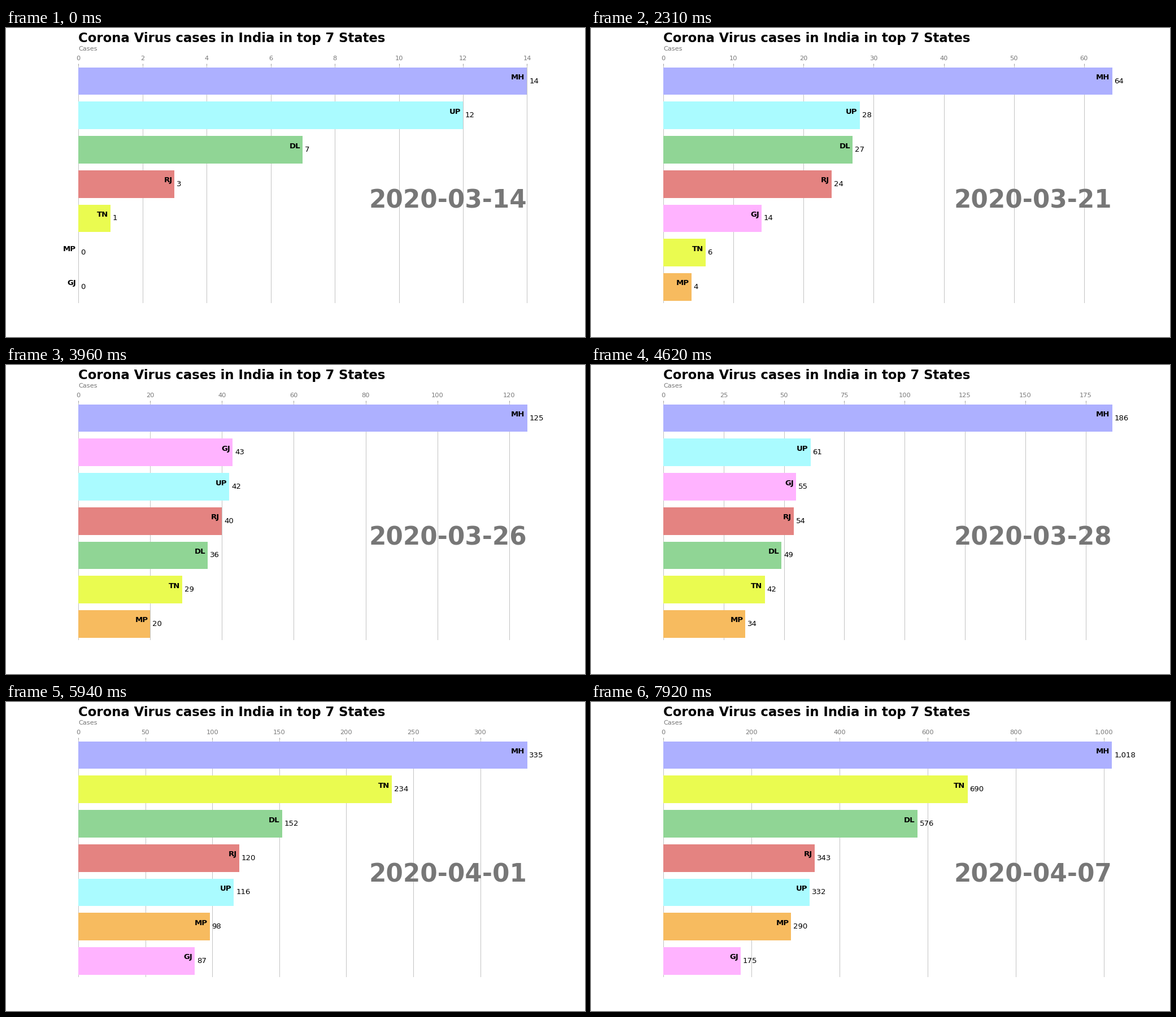
Write a matplotlib script that moves like this. It is 1025 px wide and 547 px high and loops after 8000 ms.

```python
import matplotlib.pyplot as plt
from matplotlib.animation import FuncAnimation
from matplotlib.ticker import StrMethodFormatter

W, H, DPI = 1025, 547, 64
PT = W / 15 / DPI          # the layout is designed for a 15 inch wide figure
LOOP, STEP, HOLD = 8000, 40, 330
DAYS = 25
GREY = "#777777"

states = []


def add_state(name, color, *cases):
    """Register a state; days before its first report count as zero."""
    states.append((name, color, [0] * (DAYS - len(cases)) + list(cases)))


add_state("MH", "#adb0ff", 14, 32, 38, 41, 45, 48, 52, 64, 74, 97, 107, 122, 125,
          153, 186, 203, 220, 302, 335, 423, 490, 635, 748, 868, 1018)
add_state("UP", "#aafbff", 12, 13, 13, 15, 16, 19, 23, 28, 30, 33, 35, 38, 42,
          50, 61, 72, 96, 103, 116, 126, 174, 234, 278, 305, 332)
add_state("DL", "#90d595", 7, 7, 7, 8, 10, 14, 20, 27, 29, 30, 31, 35, 36,
          40, 49, 72, 97, 120, 152, 293, 386, 445, 503, 523, 576)
add_state("RJ", "#e48381", 3, 3, 4, 4, 7, 9, 17, 24, 28, 32, 32, 38, 40,
          48, 54, 59, 79, 93, 120, 133, 179, 206, 266, 301, 343)
add_state("TN", "#eafb50", 1, 1, 1, 1, 2, 3, 3, 6, 9, 12, 18, 26, 29,
          38, 42, 50, 67, 124, 234, 309, 411, 485, 571, 621, 690)
add_state("MP", "#f7bb5f", 4, 4, 6, 7, 9, 15, 20,
          30, 34, 39, 47, 66, 98, 107, 154, 179, 215, 256, 290)
# The tiny third-day value only lifts GJ above MP while both read zero.
add_state("GJ", "#ffb3ff", 1e-6, 0, 0, 2, 7, 14, 18, 29, 34, 39, 43,
          47, 55, 63, 70, 74, 87, 88, 95, 108, 128, 146, 175)

plt.rcParams["font.family"] = "DejaVu Sans"
fig = plt.figure(figsize=(W / DPI, H / DPI), dpi=DPI, facecolor="white")
ax = fig.add_axes([0.125, 0.11, 0.775, 0.77], frameon=False)


def date_label(day):
    d = 14 + day
    return f"2020-03-{d:02d}" if d <= 31 else f"2020-04-{d - 31:02d}"


def label(x, y, text, size, **style):
    ax.text(x, y, text, size=size * PT, **style)


def style_axes():
    ax.xaxis.set_major_formatter(StrMethodFormatter("{x:,.0f}"))
    ax.xaxis.set_ticks_position("top")
    ax.tick_params(axis="x", colors=GREY, labelsize=12 * PT, length=3.5 * PT,
                   width=0.8 * PT, pad=3.5 * PT)
    ax.set_yticks([])
    ax.margins(0, 0.01)
    ax.grid(axis="x", color="#b0b0b0", linestyle="-", linewidth=0.8 * PT)
    ax.set_axisbelow(True)


def draw(frame):
    day = min((frame * STEP + STEP - 1) // HOLD, DAYS - 1)
    ranked = sorted(states, key=lambda s: s[2][day], reverse=True)[::-1]
    gap = ranked[-1][2][day] / 200

    ax.clear()
    ax.barh(range(len(ranked)), [s[2][day] for s in ranked],
            color=[s[1] for s in ranked])
    for row, (name, _, cases) in enumerate(ranked):
        value = cases[day]
        label(value - gap, row, name, 14, weight=600, ha="right", va="bottom")
        label(value + gap, row, f"{value:,.0f}", 14, ha="left", va="center")

    fixed = {"transform": ax.transAxes}
    label(1, 0.4, date_label(day), 46, color=GREY, weight=800, ha="right", **fixed)
    label(0, 1.06, "Cases", 12, color=GREY, **fixed)
    label(0, 1.14, "Corona Virus cases in India in top 7 States", 24,
          weight=600, ha="left", va="top", **fixed)
    style_axes()
    return []


anim = FuncAnimation(fig, draw, frames=LOOP // STEP, interval=STEP,
                     init_func=lambda: [], repeat=True, repeat_delay=0)
plt.show()
```
